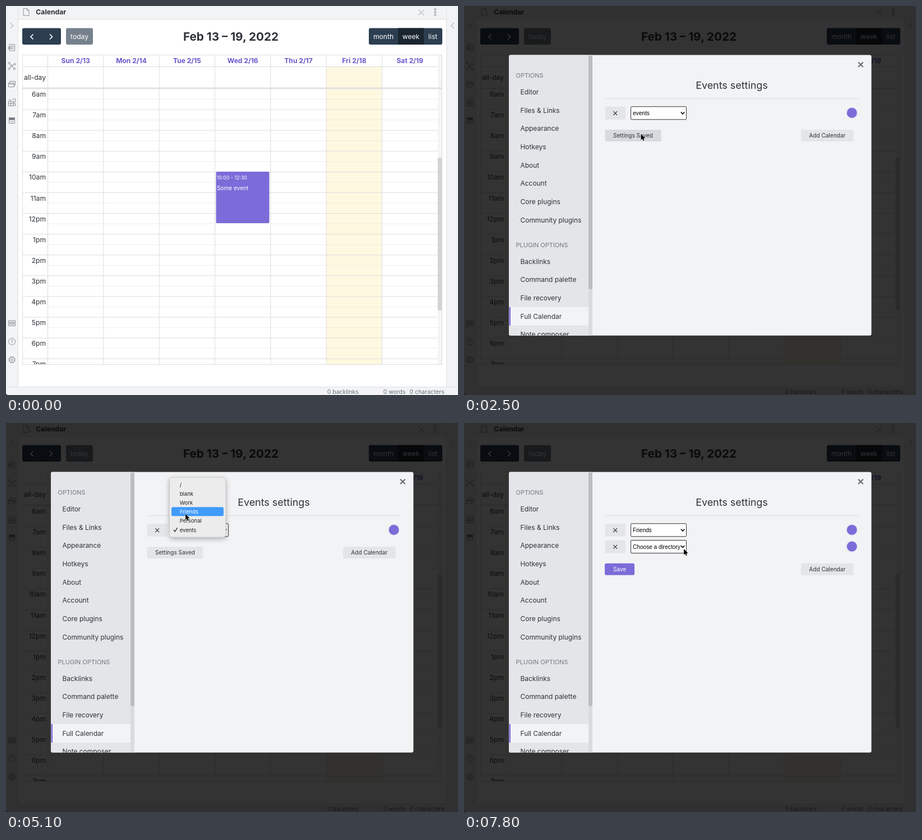
Write an HTML page that moves like this. It is 806x695 px and loops after 8 s.

```html
<!DOCTYPE html>
<html lang="en">
<head>
<meta charset="utf-8">
<title>Calendar settings</title>
<style>
html, body { margin: 0; width: 100%; height: 100%; overflow: hidden; background: #fff; }
svg { display: block; width: 806px; height: 695px; }
text { font-family: Inter, "Noto Sans", sans-serif; font-optical-sizing: none; white-space: pre; }
.native { font-family: "Liberation Sans", Arial, sans-serif; }
</style>
</head>
<body>
<svg id="stage" viewBox="0 0 806 695" xmlns="http://www.w3.org/2000/svg">
  <defs>
    <clipPath id="gridClip"><rect x="29" y="87" width="749" height="554"/></clipPath>
    <clipPath id="modalClip"><rect x="80" y="87.5" width="646.5" height="501.3" rx="3"/></clipPath>
    <filter id="shadow" x="-30%" y="-30%" width="160%" height="160%">
      <feDropShadow dx="0" dy="3" stdDeviation="4" flood-color="#000" flood-opacity=".28"/>
    </filter>
  </defs>
</svg>
<script>
const INK = '#2e3338', ACCENT = '#7b6cd9', PANEL = '#f2f3f5', SOFT = '#e3e5e8',
      NAVY = '#2c3e50', GREY = '#8c9198', GRID = '#dddddd';
const stage = document.getElementById('stage');

function el(tag, attrs, parent) {
  const node = document.createElementNS('http://www.w3.org/2000/svg', tag);
  for (const key in attrs) node.setAttribute(key, attrs[key]);
  return parent.appendChild(node);
}
const group = (parent, attrs = {}) => el('g', attrs, parent);
const rect = (p, x, y, width, height, fill, rx = 0, more = {}) =>
  el('rect', { x, y, width, height, fill, rx, ...more }, p);
const stroke = (p, d, color, width = 1, more = {}) =>
  el('path', { d, fill: 'none', stroke: color, 'stroke-width': width, ...more }, p);
const circle = (p, cx, cy, r, more) => el('circle', { cx, cy, r, ...more }, p);
function label(p, x, y, str, size, fill = INK, more = {}) {
  const node = el('text', { x, y, 'font-size': size, fill, ...more }, p);
  node.textContent = str;
  return node;
}
const MID = { 'text-anchor': 'middle' }, END = { 'text-anchor': 'end' };
const BOLD = { 'font-weight': 700 };
const ROUND = { 'stroke-linecap': 'round', 'stroke-linejoin': 'round' };
const cross = (p, x, y, r, color, width) =>
  stroke(p, `M${x - r} ${y - r}l${2 * r} ${2 * r}m0 ${-2 * r}l${-2 * r} ${2 * r}`, color, width);
const show = (node, on) => node.setAttribute('visibility', on ? 'inherit' : 'hidden');

function drawFrame(p) {
  rect(p, 0, 0, 806, 695, PANEL);
  rect(p, 22, 24, 763, 657, '#fff');
  stroke(p, 'M21.5 0V680.5M785.5 0V680.5M22 24H785M0 680.5H806', '#dfe1e4');

  // tab header
  stroke(p, 'M31 4.5H37.5L41 8V17H31ZM37.5 4.5V8H41', GREY);
  label(p, 53.3, 14.9, 'Calendar', 12.2, INK, BOLD);
  cross(p, 740.5, 11.5, 5, GREY, 1);
  for (const y of [6, 11, 16]) circle(p, 765.3, y, 1.6, { fill: 'none', stroke: GREY });

  // side ribbons
  const icons = group(p, { fill: 'none', stroke: GREY, 'stroke-width': 1 });
  const icon = d => el('path', { d }, icons);
  icon('M7.5 30L12.5 35L7.5 40M799 30L794 35L799 40');
  icon('M6 68.5H15.5V80H6ZM8 71.5H13.5M8 74H13.5M8 76.5H13.5M4.5 73H8V77H4.5Z');
  icon('M6 102.5L10 107L15 104M10 107L6 112M10 107L14.5 111.5');
  for (const [x, y] of [[5.5, 102], [15.5, 104], [10, 107], [5.5, 112], [15, 112]])
    circle(icons, x, y, 1.6, { fill: PANEL });
  icon('M6.5 137V134.5H16.5V141.5H15M4.5 137.5H14.5V144.5H4.5ZM4.5 139.5H14.5');
  icon('M4.5 170H13V178.5H4.5ZM4.5 174.2H13M8.7 170V178.5M11 166H16.5V171.5H13M13 174H16.5V178H13M5 167.5H9');
  icon('M5.5 200H15.5V209.5H5.5Z');
  rect(icons, 5.5, 199.5, 10, 4, '#777c84');
  icon('M7.5 206.5H13.5');
  icon('M4.5 562H16.5V571.5H4.5ZM6.5 564V569.5M14.5 564V569.5');
  circle(icons, 10.5, 566.7, 2.8, {});
  circle(icons, 10.5, 566.7, 1, {});
  circle(icons, 10.5, 599.5, 6, {});
  label(p, 10.5, 603, '?', 9.5, GREY, MID);
  circle(icons, 10.5, 632, 4.7, { 'stroke-width': 1.2 });
  circle(icons, 10.5, 632, 5.7, { 'stroke-dasharray': '2.3 2.18' });
  circle(icons, 10.5, 632, 1.8, {});

  // status bar
  label(p, 572.7, 692.7, '0 backlinks', 10.45, '#6a6f76');
  label(p, 672.7, 692.7, '0 words', 10.45, '#6a6f76');
  label(p, 719.7, 692.7, '0 characters', 10.45, '#6a6f76');
  el('path', { d: 'M0 692V695H3Q.6 694.4 0 692Z', fill: '#222' }, p);
}

function drawCalendar(p) {
  // toolbar
  rect(p, 29, 39.5, 69, 29.5, NAVY, 3);
  stroke(p, 'M48.5 50.5L44 55L48.5 59.5M78 50.5L82.5 55L78 59.5', '#fff', 1.7);
  rect(p, 107, 39.5, 48, 29.5, '#76818d', 3);
  rect(p, 647, 39.5, 131, 29.5, NAVY, 3);
  rect(p, 699, 39.5, 46, 29.5, '#1a252f');
  for (const [x, str] of [[131, 'today'], [673, 'month'], [722, 'week'], [761.2, 'list']])
    label(p, x, 58.8, str, 12.1, '#fff', MID);
  label(p, 401, 61.8, 'Feb 13 – 19, 2022', 20.7, INK, { ...MID, ...BOLD });

  // week grid
  const g = group(p, { 'clip-path': 'url(#gridClip)' });
  const colW = 99.35, rowH = 37.1, left = 74.5, top = 148;
  rect(g, 571.5, 109, 99, 532, '#fef8e0');
  rect(g, 770, 87, 8, 554, '#f4f4f4');
  for (let i = 0; i < 14; i++) {
    const y = top + rowH * i;
    if (i) stroke(g, `M29 ${y}H770`, GRID);
    stroke(g, `M${left} ${y + rowH / 2}H770`, GRID, 1, { 'stroke-dasharray': '1 1' });
    const hour = (i + 5) % 12 + 1;
    label(g, 71, 162 + rowH * i, hour + (i < 6 ? 'am' : 'pm'), 12.1, INK, END);
  }
  rect(g, 29, 145.5, 749, 3, '#e2e2e2');
  'Sun Mon Tue Wed Thu Fri Sat'.split(' ').forEach((day, i) => {
    const x = left + colW * i;
    stroke(g, `M${x} 87V641`, GRID);
    label(g, x + colW / 2, 102.3, `${day} 2/${13 + i}`, 12.1, '#6a58cc', { ...MID, ...BOLD });
  });
  stroke(g, 'M29.5 87.5H777.5V640.5H29.5ZM29 108.5H770', GRID);
  label(g, 71, 132.2, 'all-day', 12.1, INK, END);
  rect(g, 769.8, 271, 7.4, 273, '#d3d3d3', 2);

  rect(p, 374.5, 296, 95, 92, ACCENT, 2);
  label(p, 375.7, 309.7, '10:00 - 12:30', 8.8, '#fff');
  label(p, 375.9, 328.5, 'Some event', 10.1, '#fff');
}

function button(p, x, y, w, str, fill = SOFT, ink = INK) {
  const g = group(p);
  g.face = rect(g, x, y, w, 21, fill, 2.5);
  label(g, x + w / 2, y + 14.2, str, 10.05, ink, MID);
  return g;
}

function sourceRow(p, cy, value) {
  const g = group(p);
  rect(g, 251.5, cy - 11.5, 36.5, 23, SOFT, 2.5);
  cross(g, 269.7, cy + .3, 3.4, INK, 1.1);
  rect(g, 297.5, cy - 11.5, 99, 23, '#fff', 1.5, { stroke: '#333' });
  stroke(g, `M386.8 ${cy - 1.8}l3.2 3.4l3.2 -3.4`, '#111', 1.7);
  circle(g, 691.7, cy - .4, 9.4, { fill: ACCENT, stroke: '#d8d5ec' });
  g.value = label(g, 301, cy + 3.5, value, 10.1, '#000', { class: 'native' });
  return g;
}

function drawModal(p) {
  rect(p, 0, 0, 806, 695, '#000', 0, { opacity: .8 });
  const g = group(p, { 'clip-path': 'url(#modalClip)' });
  rect(g, 80, 87, 647, 503, PANEL);
  rect(g, 80, 87, 142, 503, SOFT);
  rect(g, 222, 87, 7, 503, '#d9dbde');
  rect(g, 222, 88.5, 7, 417.5, '#bcbdc0', 2.5);
  rect(g, 80, 538, 142, 33, PANEL);
  rect(g, 80.5, 538, 2.5, 33, ACCENT);

  const menu = (y, heading, items) => {
    label(g, 92.6, y, heading, 10.95, '#72777e');
    items.forEach((str, i) => label(g, 100.5, y + 30.3 + 32.66 * i, str, 11.95));
  };
  menu(127.7, 'OPTIONS', ['Editor', 'Files & Links', 'Appearance', 'Hotkeys', 'About',
    'Account', 'Core plugins', 'Community plugins']);
  menu(430.5, 'PLUGIN OPTIONS', ['Backlinks', 'Command palette', 'File recovery',
    'Full Calendar', 'Note composer']);

  cross(g, 707.4, 104.8, 4.3, '#666a70', 2.1);
  label(g, 477.5, 147.7, 'Events settings', 17.9, INK, MID);
  stroke(g, 'M251 165.5H704', '#d9dbde');

  const row = sourceRow(g, 191.3, 'events');
  const newRow = sourceRow(g, 221, 'Choose a directory');
  const footer = group(g);
  const saved = button(footer, 251.5, 221, 100, 'Settings Saved');
  const save = button(footer, 251, 221, 53, 'Save', ACCENT, '#fff');
  button(footer, 601, 221, 93.5, 'Add Calendar');
  return { row, newRow, footer, saved, save };
}

const OPTION_TOP = 110, OPTION_H = 16.22;
function drawPopup(p) {
  const g = group(p);
  rect(g, 291.5, 97, 100.5, 107, '#ececec', 5,
    { stroke: '#b9b9b9', 'stroke-width': .7, filter: 'url(#shadow)' });
  const mark = rect(g, 295, 150, 93, 16, '#409bfb', 2.5);
  const options = ['/', 'blank', 'Work', 'Friends', 'Personal', 'events'].map((str, i) =>
    label(g, 309.7, OPTION_TOP + OPTION_H * i + 3.5, str, 9.5, '#222'));
  const tick = stroke(g, 'M299 191.2L301.3 194L305.3 187.6', '#222', 1.3, ROUND);
  const highlight = n => {
    show(mark, n >= 0);
    mark.setAttribute('y', OPTION_TOP + OPTION_H * n - 8.4);
    options.forEach((o, i) => o.setAttribute('fill', i === n ? '#fff' : '#222'));
    tick.setAttribute('stroke', n === 5 ? '#fff' : '#222');
  };
  return { g, highlight };
}

const base = group(stage);
drawFrame(base);
drawCalendar(base);
const modal = group(stage);
const ui = drawModal(modal);
const popup = drawPopup(modal);
const ring = circle(stage, 0, 0, 15.3, { fill: 'none', stroke: '#000', 'stroke-width': 2.2 });
const cursor = el('path', {
  d: 'M0 0V10.6L2.4 8.4L4 12L5.8 11.2L4.3 7.7H7.6Z',
  fill: '#000', stroke: '#fff', 'stroke-width': .9, 'paint-order': 'stroke'
}, stage);

// pointer stops: time, x, y
const PATH = [
  [1700, 530, 616], [2600, 308, 215], [3000, 277, 195], [3200, 277, 195],
  [3400, 272, 206], [3500, 282, 217], [3700, 319, 191.5], [4200, 319, 191.5],
  [5100, 320, 162.5], [5900, 320, 162.5], [6400, 295, 240], [6600, 303, 248],
  [6800, 341, 236.7], [7200, 635, 231], [7300, 635, 231], [7800, 392, 225]
];
const CLICKS = [3800, 5600, 7300];

function pointerAt(t) {
  const n = PATH.findIndex(stop => stop[0] > t);
  if (n === 0) return PATH[0].slice(1);
  if (n < 0) return PATH[PATH.length - 1].slice(1);
  const [t0, x0, y0] = PATH[n - 1], [t1, x1, y1] = PATH[n];
  const u = (t - t0) / (t1 - t0), k = u * u * (3 - 2 * u);
  return [x0 + (x1 - x0) * k, y0 + (y1 - y0) * k];
}

function render(t) {
  const [x, y] = pointerAt(t);
  const chosen = t >= 5900, added = t >= 7400;
  show(cursor, t >= 300);
  cursor.setAttribute('transform', `translate(${x} ${y})`);
  show(ring, CLICKS.includes(t));
  ring.setAttribute('cx', x + .3);
  ring.setAttribute('cy', y + .3);

  show(modal, t >= 1000);
  ui.row.value.textContent = chosen ? 'Friends' : 'events';
  show(ui.saved, !chosen);
  show(ui.save, chosen);
  const hover = x > 251 && x < 351 && y > 221 && y < 242;
  ui.saved.face.setAttribute('fill', hover ? '#d7dade' : SOFT);
  show(ui.newRow, added);
  ui.footer.setAttribute('transform', `translate(0 ${added ? 29.7 : 0})`);

  const open = t >= 3900 && !chosen;
  popup.highlight(open && t !== 5700 ? Math.round((y - OPTION_TOP) / OPTION_H) : -1);
  show(popup.g, open);
  if (!open) popup.g.setAttribute('display', 'none');
  else popup.g.removeAttribute('display');
}

const LOOP = 8000, STEP = 100;
const start = performance.now();
let last = -1;
function tick(now) {
  const t = Math.floor(Math.max(0, now - start) % LOOP / STEP) * STEP;
  if (t !== last) render(last = t);
  requestAnimationFrame(tick);
}
render(0);
requestAnimationFrame(tick);
</script>
</body>
</html>
```
